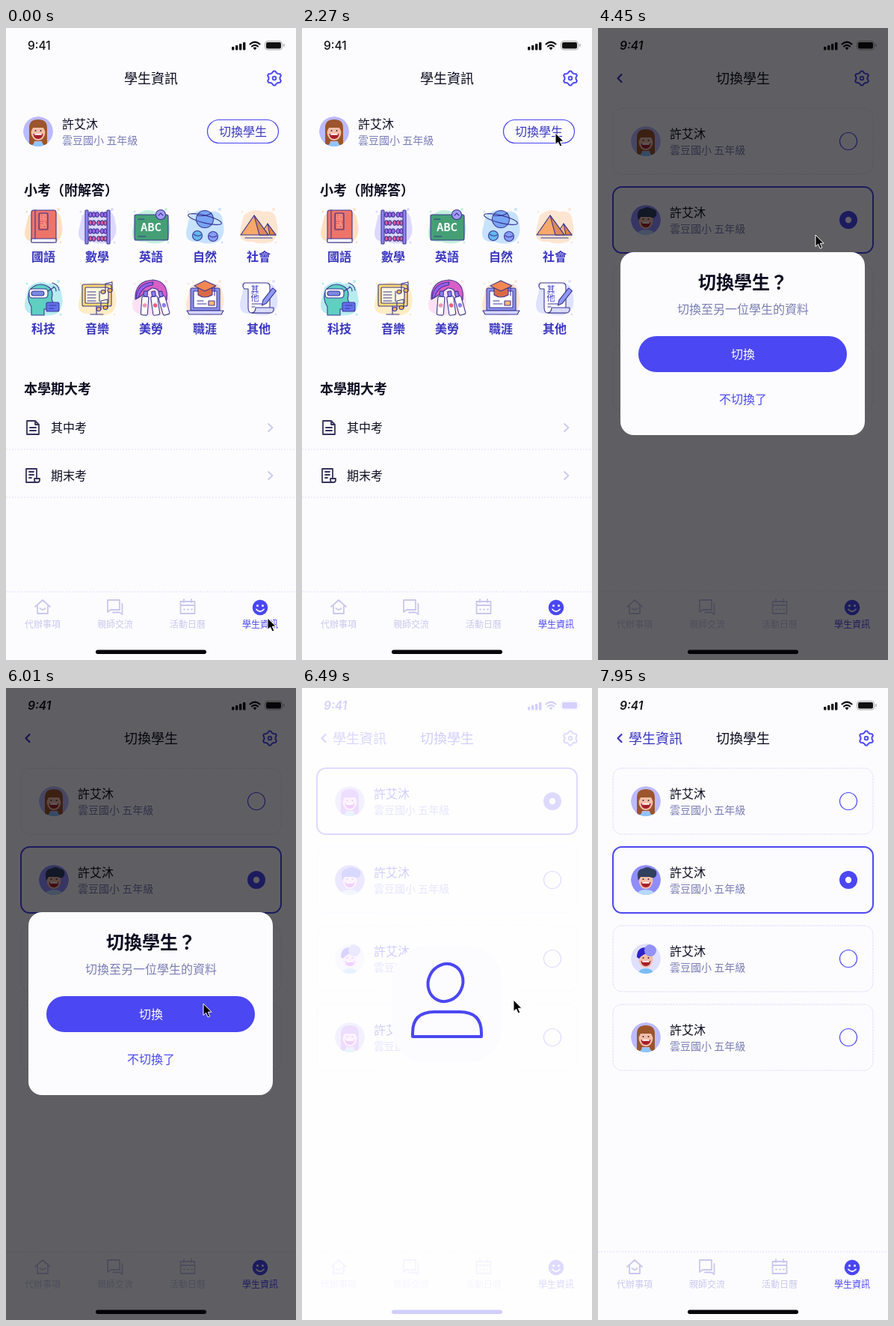
Animation of 388 by 843 pixels, one loop 7.99 s. Source, as an HTML page:

```html
<!DOCTYPE html>
<html lang="zh-Hant">
<head>
<meta charset="utf-8">
<style>
html, body { margin: 0; width: 100%; height: 100%; overflow: hidden; background: #fcfcff; }
svg { display: block; width: 100%; height: 100%; }
text { font-family: "Noto Sans CJK TC", "Noto Sans CJK SC", "Noto Sans CJK JP", "Noto Sans CJK", sans-serif; }
.time { font-family: Inter, Roboto, sans-serif; }
.line { fill: none; stroke-linecap: round; stroke-linejoin: round; }
.art { stroke: #3b3694; stroke-width: 1.1; stroke-linejoin: round; stroke-linecap: round; }
</style>
</head>
<body>
<svg id="stage" viewBox="0 0 388 843"></svg>
<script>
const LOOP = 7990;
const BG = '#fcfcff', INK = '#0c0c20', BLUE = '#4b47f2', NAVY = '#3a36c0', SOFT = '#7a7eb4', PALE = '#c9c8ee', RULE = '#dfddfa';
const NAME = '許艾沐', SCHOOL = '雲豆國小 五年級';

// y is the middle of the line
const text = (x, y, size, s, fill = INK, weight = 400, anchor = 'start') =>
  `<text x="${x}" y="${y + size * .38}" font-size="${size}" fill="${fill}" font-weight="${weight}" text-anchor="${anchor}">${s}</text>`;
const mid = (x, y, size, s, fill, weight) => text(x, y, size, s, fill, weight, 'middle');
const at = (x, y, s, extra = '') => `<g transform="translate(${x} ${y}) ${extra}">${s}</g>`;
const line = (d, color, width = 2) => `<path class="line" d="${d}" stroke="${color}" stroke-width="${width}"/>`;
const path = (d, fill) => `<path d="${d}" fill="${fill}"/>`;
const dot = (x, y, r, fill, more = '') => `<circle cx="${x}" cy="${y}" r="${r}" fill="${fill}" ${more}/>`;
const oval = (x, y, rx, ry, fill, more = '') => `<ellipse cx="${x}" cy="${y}" rx="${rx}" ry="${ry}" fill="${fill}" ${more}/>`;
const rect = (x, y, w, h, r, fill, more = '') => `<rect x="${x}" y="${y}" width="${w}" height="${h}" rx="${r}" fill="${fill}" ${more}/>`;
const rule = y => `<path d="M0 ${y}H388" stroke="${RULE}" stroke-dasharray="2 2"/>`;

function gear(x) {
  let d = '';
  for (let i = 0; i < 24; i++) {
    const a = (i - .5) * Math.PI / 12, r = i % 4 < 2 ? 9.6 : 7.6;
    d += `${i ? 'L' : 'M'}${(r * Math.sin(a)).toFixed(2)} ${(-r * Math.cos(a)).toFixed(2)}`;
  }
  return at(x, 67, line(d + 'Z', BLUE) + line('M-2.3 0a2.3 2.3 0 1 0 4.6 0a2.3 2.3 0 1 0 -4.6 0', BLUE, 1.8));
}

function status(italic) {
  let s = `<text class="time" x="29" y="29" font-size="15.5" fill="#111" font-weight="${italic ? 600 : 500}" ${italic ? 'font-style="italic"' : ''}>9:41</text>`;
  for (let i = 0; i < 4; i++) s += rect(302 + i * 5, 25 - i * 2, 3.4, 4.5 + i * 2, 1, '#111');
  s += line('M326.5 21.5q6.5 -5.5 13 0M329 24.5q4 -3.2 8 0', '#111', 2.2) + path('M330.5 26.5q2.5 -2 5 0l-2.5 3z', '#111');
  return s + rect(346.5, 17.5, 23, 11.5, 3.5, 'none', 'stroke="#aaa"') + rect(348, 19, 20, 8.5, 2, '#111') + rect(371, 21, 1.5, 4, .7, '#aaa');
}

const tabs = rule(752) +
  at(49, 772, line('M-10 0L0 -9L10 0M-7 -2V9H7V-2M-3.5 2q3.5 4 7 0', PALE, 1.8)) +
  at(146, 772, line('M-10 -9H6V4H-6L-10 7ZM9.5 -4V10L6 7.5H-3', PALE, 1.8)) +
  at(243, 772, line('M-9.5 -7H9.5V9H-9.5ZM-9.5 -2H9.5M-5 -10V-6M5 -10V-6M-5 3.5h1M0 3.5h1M5 3.5h1', PALE, 1.8)) +
  at(340, 773, dot(0, 0, 10.3, BLUE) + dot(-3.5, -2.5, 1.5, BG) + dot(3.5, -2.5, 1.5, BG) + line('M-5 2.5q5 5.5 10 0', BG, 1.8)) +
  ['代辦事項', '親師交流', '活動日曆', '學生資訊'].map((s, i) => mid(49 + i * 97, 795, 12, s, i < 3 ? PALE : BLUE)).join('') +
  rect(120, 829.5, 148, 5.5, 2.75, '#08080c');

const shell = (title, body, italic, gearX = 359) =>
  rect(0, 0, 388, 843, 0, BG) + status(italic) + mid(194, 67, 18, title) + gear(gearX) + body + tabs;

// Avatars, radius 20
const face = oval(0, 1, 9.5, 11, '#f3bea8') + dot(-3.5, -1, 1, '#40283a') + dot(3.5, -1, 1, '#40283a') +
  path('M-6.5 3H6.5Q6 10 0 10T-6.5 3Z', '#a81f2c') + rect(-5, 3, 10, 1.8, .8, '#fff');
const avatars = {
  girl: dot(0, 0, 20, '#bcbaff') + path('M-12 17V-5Q-12 -16 0 -16T12 -5V17Q6 21 5 13H-5Q-6 21 -12 17Z', '#9c552c') +
    path('M-8 20Q-7 14 0 14T8 20Z', '#8fc4ff') + face + path('M-10 1Q-11 -13 0 -13T10 1Q8 -3 7 -5H-7Q-8 -3 -10 1Z', '#9c552c'),
  boy: dot(0, 0, 20, '#908dff') + path('M-12 20Q-11 13 0 13T12 20Z', '#b8d8ff') + face +
    path('M-10 1Q-14 -14 -4 -15Q2 -19 8 -15Q16 -14 14 -6Q12 -1 5 -4Q-3 -4 -7 -4Z', '#30405f'),
  cap: dot(0, 0, 20, '#dfdfff') + path('M-10 20Q-9 13 0 13T10 20Z', '#79bdf5') + face +
    path('M-12 -2Q-12 -15 0 -15L6 -8Q-4 -7 -9 0Z', '#2d22c8') + dot(6, -11, 8, '#9391ff')
};
const avatar = (kind, x, y) => at(x, y, `<g clip-path="url(#round)">${avatars[kind]}</g>`);

// Subject icons, about 50 px wide
const blob = c => `<g opacity=".8">` + path('M-20 -14Q-8 -25 6 -19Q23 -22 24 -6Q29 12 18 21Q4 26 -8 21Q-26 23 -25 8Q-24 2 -20 -14Z', c) +
  dot(-22, -19, 1.5, c) + dot(20, -22, 2, c) + dot(23, 22, 1.5, c) + '</g>';
const art = s => `<g class="art">${s}</g>`;
const stroke = d => line(d, '#3b3694', 1.1);
const rows = [-15, -4, 7, 17];
const note = (x, y) => at(x, y, oval(0, 8, 3, 2.5, '#ffb84d') + oval(9, 6, 3, 2.5, '#ffb84d') + stroke('M3 8V-3L12 -5V6'));
const bottle = (x, a, c) => at(x, 5, rect(-4.5, -7, 9, 25, 2, '#fff') + rect(-2.5, -14, 5, 7, 1, '#8d7bf0') + dot(0, 5, 2.8, c, 'stroke="none"'), `rotate(${a})`);
const subjects = [
  ['國語', '#ffd8b0', art(rect(-16, -21, 33, 43, 3, '#ee7468') + path('M-16 17H17V22H-16Z', '#fff') + path('M-11 -21V17', 'none') + rect(-6, -17, 12, 22, 1, '#e2605a')) + mid(0, -11, 9, '國', '#ffc0a8') + mid(0, -1, 9, '語', '#ffc0a8')],
  ['數學', '#d5d0ff', art(rows.map((y, r) => stroke(`M-14 ${y}H15`) + [0, 1, 2, 3, 4].map(i => oval(-9 + i * 4.5 + (i > 2 - r % 2) * 2, y, 2.2, 3.2, r % 2 ? '#e65b9c' : '#a06bea')).join('')).join('') + rect(-16, -21, 4, 45, 1, '#8f88f0') + rect(13, -21, 4, 45, 1, '#8f88f0'))],
  ['英語', '#b5ecd5', art(rect(-22, -15, 45, 34, 2, '#459f75') + dot(13, -15, 6.5, '#a59cf8') + stroke('M10 -14l3 -3 3 3M-17 -9h8M-17 14h10')) + mid(0, 2, 14, 'ABC', '#fff', 700)],
  ['自然', '#b9dcff', art(dot(0, -9, 11.5, '#78a4f4') + oval(0, -9, 23, 5, 'none', 'transform="rotate(14 0 -9)"') + path('M-10 -14Q0 -12 9 -17', 'none') + dot(-10, 13, 6.5, '#62b9ec') + dot(11, 14, 6.5, '#849cf4') + path('M-15 11q5 4 10 1M6 13q5 4 10 0', 'none'))],
  ['社會', '#ffe0c6', art(path('M2 12L12 -3L23 12Z', '#f5b36d') + path('M12 -3L15 12H23Z', '#dc8250') + path('M-24 12L-6 -14L13 12Z', '#f6a96a') + path('M-6 -14L1 12H13Z', '#dd8a5c') + stroke('M-18 16H18'))],
  ['科技', '#a6e9ee', art(path('M-16 23V12Q-24 0 -17 -12Q-6 -23 8 -14Q14 -8 11 1L13 7H9V15H1V23Z', '#5fcfc2') + rect(-19, -12, 25, 12, 4, '#fff') + rect(-16, -9, 17, 6, 3, '#7a8ae4') + path('M6 -9L14 -14', 'none') + rect(4, 6, 17, 12, 2, '#6270ee') + stroke('M8 10h9M8 14h6M12 -20q8 2 9 10M13 -15q4 1 4 6'))],
  ['音樂', '#ffe9b8', art(rect(-20, -18, 39, 29, 2, '#ffdb70') + rect(-16, -14, 31, 21, 1, '#fff8e2') + stroke('M-13 -8h11M-13 -4h11M-13 0h11M-13 4h11M-1 11V22M-9 22H8M3 -9v14') + note(8, -16) + note(2, 7))],
  ['美勞', '#ffdcf1', art(path('M-21 2Q-22 -23 3 -24Q24 -22 21 3L13 -1Q11 -14 1 -13Q-6 -8 -14 -2Z', '#d95fc6') + path('M-20 0Q-18 -20 3 -21L2 -17Q-12 -16 -17 0Z', '#9c5ff0') + bottle(16, -16, '#937df2') + bottle(5, -8, '#f05d80') + bottle(-8, 4, '#f394b8'))],
  ['職涯', '#ffe0cf', art(rect(-19, -13, 39, 30, 2, '#8b92ea') + rect(-15, -9, 31, 22, 0, '#fff') + path('M-24 17H25L22 22H-21Z', '#d6d7ff') + path('M-9 -13V-4Q0 2 10 -4V-13Z', '#d96a45') + path('M-14 -16L0 -23L15 -16L0 -9Z', '#f38753') + stroke('M13 -15V-3M-10 4h8M-10 8h12') + rect(5, 4, 8, 6, 0, '#ffb87a'))],
  ['其他', '#d8dcff', art(path('M-19 -20H10Q15 -20 15 -15V20H-9Q-14 20 -14 13V-12H-19Q-23 -16 -19 -20Z', '#fff') + path('M-9 20Q-4 19 -4 13H20Q21 20 15 20Z', '#d9dcff') + stroke('M-9 8h15M-9 12h4') + at(13, -1, path('M-3 -13H3V8L0 14L-3 8Z', '#8f9af2'), 'rotate(38)')) + mid(-5, -11, 11, '其', NAVY) + mid(-5, 0, 11, '他', NAVY)]
];

const exam = (y, label, icon) => at(36, y, line(icon, '#34345c', 1.8)) + text(60, y, 16, label) +
  line(`M351 ${y - 5}l5.5 5 -5.5 5`, PALE, 1.8) + rule(y + 29);

const home = shell('學生資訊',
  avatar('girl', 43, 138) + text(75, 128, 16, NAME) + text(75, 150, 14, SCHOOL, SOFT) +
  rect(269.5, 122.5, 95, 31, 15.5, 'none', `stroke="${BLUE}" stroke-width="1.2"`) + mid(317, 138, 16, '切換學生', NAVY) +
  text(24, 216, 18, '小考（附解答）', INK, 700) +
  subjects.map(([label, tint, icon], i) => {
    const x = 50 + i % 5 * 72, y = i < 5 ? 264 : 360;
    return at(x, y, blob(tint) + icon) + mid(x, y + 41, 16, label, NAVY, 700);
  }).join('') +
  text(24, 481, 18, '本學期大考', INK, 700) +
  exam(533, '其中考', 'M-8 -9H3L8 -4V9H-8ZM3 -9V-4H8M-4 0H4M-4 4H4') +
  exam(597, '期末考', 'M5 4V-9H-9V9H6Q9 9 9 6V4H2V6Q2 9 5 9M-5 -5H1M-5 -1H1M-5 3H-2'));

const card = (kind, i, on) => {
  const y = 151 + i * 105;
  return rect(20, y - 44, 348, 88, 12, 'none', on ? `stroke="${BLUE}" stroke-width="2"` : `stroke="${RULE}" stroke-dasharray="3 1"`) +
    avatar(kind, 64, y) + text(96, y - 10, 16, NAME) + text(96, y + 12, 14, SCHOOL, SOFT) +
    (on ? dot(335, y, 12, BLUE) + dot(335, y, 4.2, BG) : dot(335, y, 11.5, 'none', `stroke="${BLUE}" stroke-width="1.2"`));
};
const list = (chosen, back = true) => shell('切換學生',
  line('M31.5 62l-5 5 5 5', NAVY, 2.2) + (back ? text(41, 67, 18, '學生資訊', NAVY) : '') +
  ['girl', 'boy', 'cap', 'girl'].map((k, i) => card(k, i, i === chosen)).join(''), true, back ? 359 : 353);

const dialog = list(1, false) + rect(0, 0, 388, 843, 0, 'rgba(0,0,4,.62)') +
  rect(30, 299, 327, 244, 18, BG) + mid(194, 339, 24, '切換學生？', INK, 700) +
  mid(194, 375, 16, '切換至另一位學生的資料', SOFT) +
  rect(54, 411, 279, 48, 24, BLUE) + mid(194, 435, 16, '切換', '#fff') + mid(194, 495, 16, '不切換了', BLUE);

const loader = list(0) + rect(0, 0, 388, 843, 0, '#d0ccff', 'style="mix-blend-mode:screen"') +
  rect(120, 344, 148, 156, 48, BG) +
  `<g class="line" stroke="${BLUE}" stroke-width="4"><ellipse id="head" cx="192" cy="393" rx="23" ry="25.5"/>
  <path d="M148 465V460Q148 432 177 432H211Q240 432 240 460V465Z"/></g>`;

// Each page dissolves over the one before: [markup, start, end]
const pages = [[home, -2, -1], [list(0), 2480, 2780], [list(1), 3560, 3840], [dialog, 3880, 4180], [loader, 6190, 6450], [list(1), 7250, 7560]];
const stage = document.getElementById('stage');
stage.innerHTML = `<clipPath id="round"><circle r="20"/></clipPath>` + pages.map(p => `<g class="page">${p[0]}</g>`).join('') +
  `<path id="cursor" d="M0 0V15.5L3.6 12.2L6.2 18L8.8 16.9L6.3 11.2H11Z" fill="#000" stroke="#fff"/>`;
const layers = [...stage.querySelectorAll('.page')];
const head = document.getElementById('head'), cursor = document.getElementById('cursor');

// Cursor tip: [time, x, y]
const route = [[0, 350, 787], [350, 350, 787], [1250, 380, 180], [1380, 380, 180], [2050, 339, 140], [3100, 339, 140], [3450, 335, 252],
  [3950, 335, 252], [4400, 291, 276], [4600, 291, 276], [5350, 264, 421], [6220, 264, 421], [6490, 283, 416], [7000, 402, 380], [LOOP, 402, 380]];
const ease = k => k * k * (3 - 2 * k);
const ramp = (t, a, b) => ease(Math.min(1, Math.max(0, (t - a) / (b - a))));

function draw(now) {
  const t = now % LOOP;
  pages.forEach(([, a, b], i) => {
    const o = ramp(t, a, b);
    layers[i].style.opacity = o;
    layers[i].style.display = o && !(pages[i + 1] && t >= pages[i + 1][2]) ? '' : 'none';
  });
  head.setAttribute('transform', `rotate(${25 * Math.cos((t - 6490) / 180)} 192 393)`);
  const i = route.findIndex(p => p[0] > t), [a, x, y] = route[i - 1], [b, x2, y2] = route[i];
  const k = ramp(t, a, b);
  cursor.setAttribute('transform', `translate(${x + (x2 - x) * k} ${y + (y2 - y) * k})`);
  requestAnimationFrame(draw);
}
requestAnimationFrame(draw);
</script>
</body>
</html>
```
